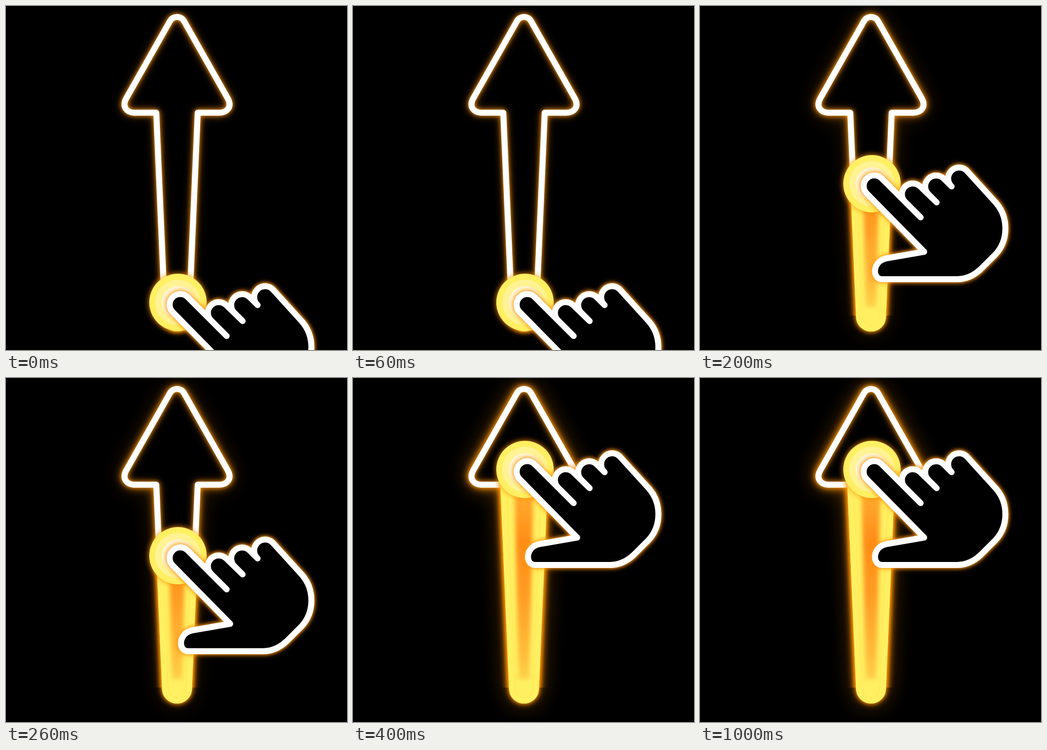
Animation of 683x690 px, one loop 1.4 s. Source, as an HTML page:

```html
<!DOCTYPE html>
<html lang="en">
<head>
<meta charset="utf-8">
<title>Swipe up</title>
<style>
  html, body { margin: 0; width: 100%; height: 100%; overflow: hidden; background: #000; }
  svg { display: block; width: 100%; height: 100%; }
  path { stroke-width: 12; stroke-linejoin: round; stroke-linecap: round; }
  #body { filter: drop-shadow(0 0 4px #ff9800) drop-shadow(0 0 6px #ff8a0090); }
  #dot { filter: drop-shadow(0 0 6px #ff9000); }
  #hand { filter: drop-shadow(0 0 3px #ffa020) drop-shadow(0 0 5px #ff8a00b0); }
</style>
</head>
<body>
<svg viewBox="0 0 683 690">
  <defs>
    <path id="arrow" d="M301 214H258C243 214 231 203 241 185L328 31C334 19 351 19 357 31L444 185C454 203 442 214 427 214H384L366.500 623A24 24 0 0 1 318.500 623Z"/>
    <path id="shaft" d="M301 214L318.500 623A24 24 0 0 0 366.500 623L384 214Z"/>
    <linearGradient id="heat" gradientUnits="userSpaceOnUse" x1="0" y1="214" x2="0" y2="620">
      <stop offset="0" stop-color="#ffb232"/>
      <stop offset=".28" stop-color="#ff8d18"/>
      <stop offset=".55" stop-color="#ff9c24"/>
      <stop offset=".85" stop-color="#ffbe3c"/>
      <stop offset="1" stop-color="#ffd84e"/>
    </linearGradient>
    <clipPath id="below"><rect id="cut" width="683" height="690"/></clipPath>
    <filter id="soft" filterUnits="userSpaceOnUse" width="683" height="690"><feGaussianBlur stdDeviation="4.500"/></filter>
    <filter id="wide" filterUnits="userSpaceOnUse" width="683" height="690"><feGaussianBlur stdDeviation="9"/></filter>
    <filter id="halo" filterUnits="userSpaceOnUse" x="-80" y="-80" width="843" height="850"><feGaussianBlur stdDeviation="24"/></filter>
  </defs>
  <rect width="683" height="690"/>

  <g id="aura" fill="#ff9500" stroke="#ff9500">
    <use href="#arrow" filter="url(#halo)" opacity=".4"/>
    <use href="#arrow" filter="url(#wide)" opacity=".6"/>
  </g>
  <use href="#arrow" fill="#000"/>
  <g fill="none">
    <use href="#arrow" stroke="#ff8c00" filter="url(#wide)" opacity=".5"/>
    <use href="#arrow" stroke="#ff9a14" filter="url(#soft)"/>
    <use href="#arrow" stroke="#fff"/>
  </g>

  <g id="body">
    <g clip-path="url(#below)">
      <use href="#shaft" fill="#fff062" stroke="#fff062"/>
      <path d="M308 214L325 624A17.500 17.500 0 0 0 360 624L377 214" fill="none" stroke="#ffe752" style="stroke-width:2" opacity=".6"/>
      <path d="M323 200L332 604H353L362 200Z" fill="url(#heat)" filter="url(#soft)"/>
    </g>
  </g>

  <g id="touch">
    <g id="dot">
      <circle cx="344.500" cy="476.500" r="57.500" fill="#ffef62"/>
      <circle cx="344.500" cy="476.500" r="45.500" fill="#fff394"/>
      <circle cx="344.500" cy="476.500" r="33" fill="#fff6d4"/>
    </g>
    <path id="hand" stroke="#fff" d="M334 496A21 21 0 0 1 364 466L442 544L411 513A21 21 0 0 1 441 482L474 514L458 498A21 21 0 0 1 488 466L504 482A21 21 0 0 1 534 450L593 515C618 544 618 590 592 618L562 648C548 661 532 668 515 668H365C344 668 345 631 374 626L449 613Z"/>
  </g>
</svg>
<script>
  const get = id => document.getElementById(id);
  const heights = [594.5, 476.5, 356.5, 240.5, 183.5];

  function draw(now) {
    const step = Math.min(4, Math.floor(now % 1400 / 100));
    const y = heights[step];
    get('touch').setAttribute('transform', `translate(0 ${y - 476.5})`);
    get('cut').setAttribute('y', y);
    get('aura').setAttribute('opacity', step / 4);
    requestAnimationFrame(draw);
  }
  draw(0);
</script>
</body>
</html>
```
